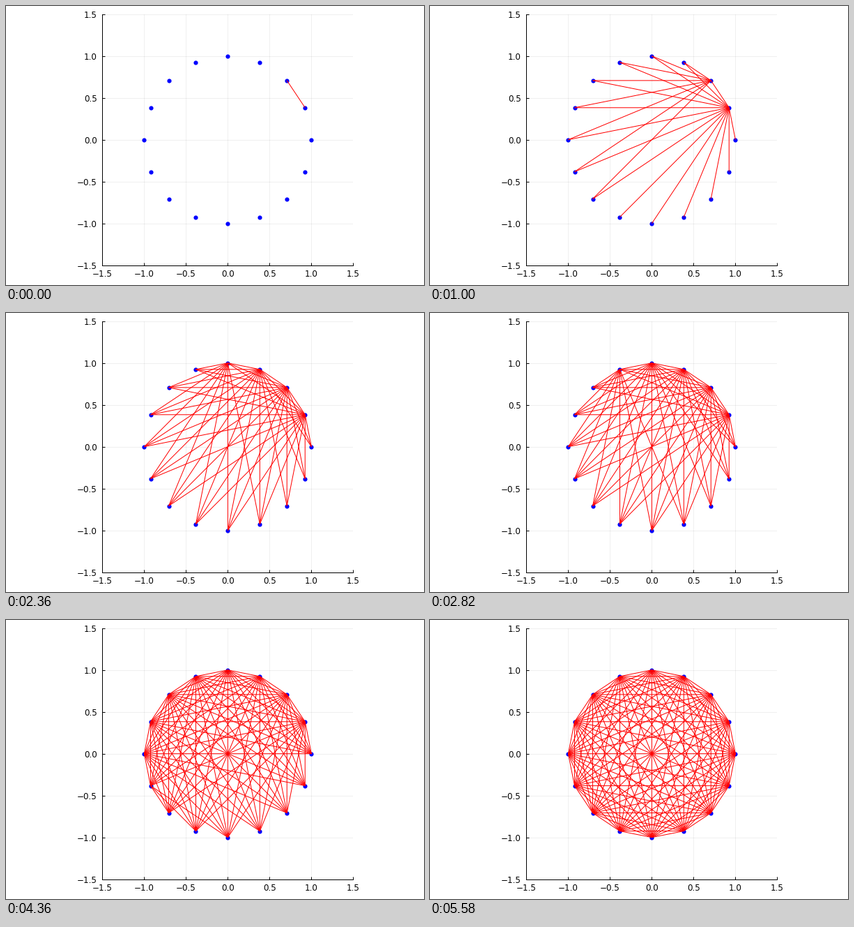
A matplotlib script for the animation above (5.68 s loop, 600x400 px).

```python
from itertools import combinations

import numpy as np
import matplotlib.pyplot as plt
from matplotlib.animation import FuncAnimation
from matplotlib.collections import LineCollection

W, H, DPI = 600, 400, 100
PX = 72 / DPI            # one pixel in points
TICK_MS = 20
N = 16

plt.rcParams["font.family"] = "DejaVu Sans"

# Points on the unit circle and every chord between them
angles = 2 * np.pi * np.arange(1, N + 1) / N
points = np.column_stack([np.cos(angles), np.sin(angles)])
chords = [(points[a], points[b]) for a, b in combinations(range(N), 2)]

# Every third chord, and the finished figure, holds for 100 ms; others for 20 ms
last = len(chords) - 1
holds = [5 if k % 3 == 1 or k == last else 1 for k in range(len(chords))]
shown = np.repeat(np.arange(1, len(chords) + 1), holds)

fig = plt.figure(figsize=(W / DPI, H / DPI), dpi=DPI, facecolor="white")
ax = fig.add_axes([138.4 / W, (H - 371.7) / H, 360 / W, 360 / H])
ax.set(xlim=(-1.5, 1.5), ylim=(-1.5, 1.5))
ticks = np.linspace(-1.5, 1.5, 7)
ax.set_xticks(ticks)
ax.set_yticks(ticks)
ax.set_axisbelow(True)
ax.grid(color="black", alpha=0.1, linewidth=0.6 * PX)
ax.tick_params(direction="in", length=3.6 * PX, width=PX,
               labelsize=11.85 * PX)
ax.tick_params(axis="x", pad=6.8 * PX)
ax.tick_params(axis="y", pad=7.7 * PX)
for side in ("top", "right"):
    ax.spines[side].set_visible(False)
for side in ("left", "bottom"):
    ax.spines[side].set_linewidth(PX)

ax.plot(*points.T, "o", color="blue", markersize=6.2 * PX,
        markeredgewidth=0, zorder=3)
lines = LineCollection([], colors="red", linewidths=PX, zorder=4)
lines.set_snap(False)
ax.add_collection(lines, autolim=False)


def update(i):
    lines.set_segments(chords[:shown[i]])
    return [lines]


anim = FuncAnimation(fig, update, frames=len(shown), interval=TICK_MS,
                     repeat=True, repeat_delay=0)
plt.show()
```
